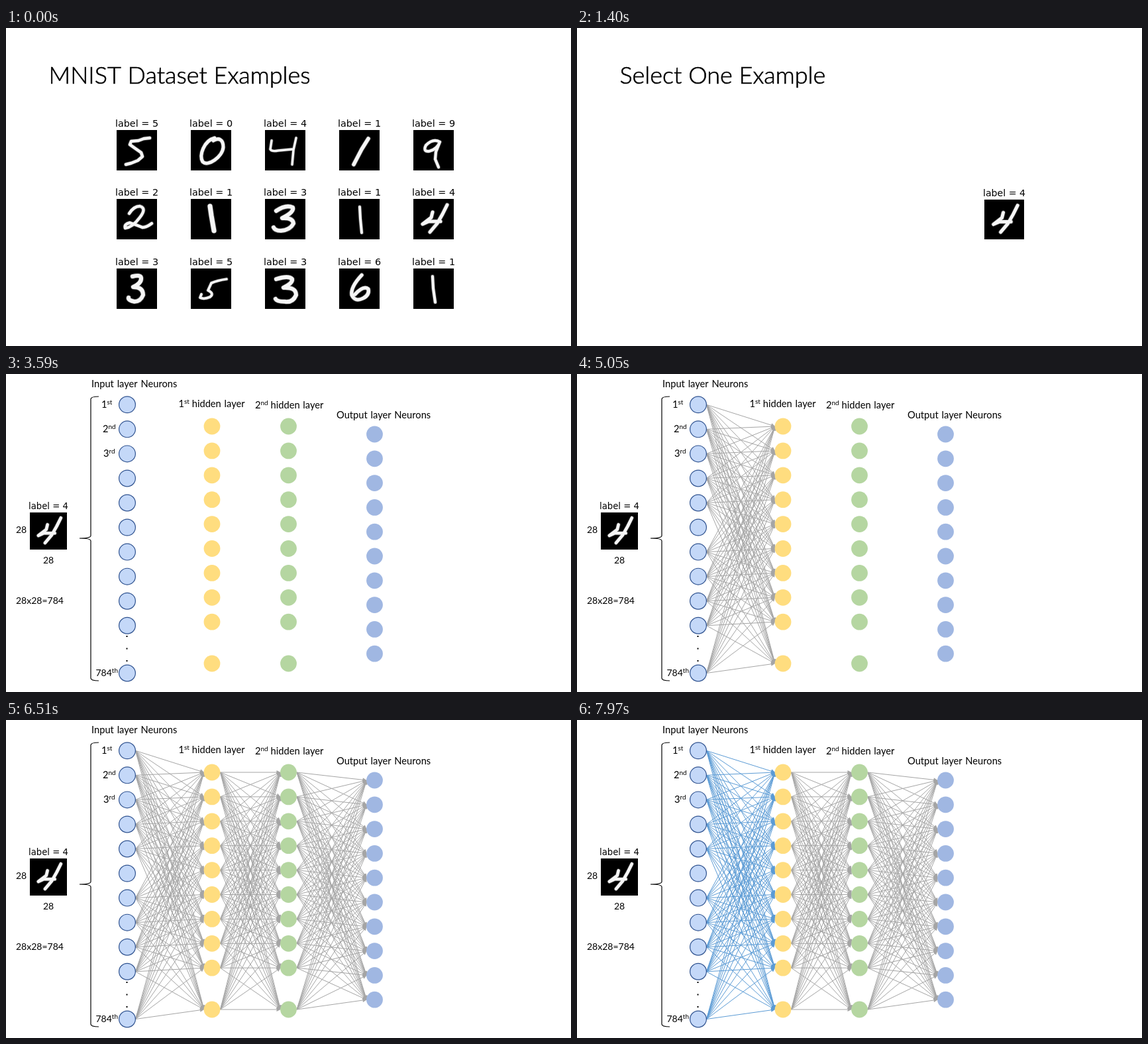
Animation of 853 by 480 pixels, one loop 8000 ms. Source, as an HTML page with a canvas:

```html
<!DOCTYPE html>
<html lang="en">
<head>
<meta charset="utf-8">
<title>Digit network</title>
<style>
html, body { margin: 0; width: 100%; height: 100%; overflow: hidden; background: #fff; }
canvas { display: block; }
</style>
</head>
<body>
<canvas id="stage" width="853" height="480"></canvas>
<script>
const ctx = document.getElementById('stage').getContext('2d');
const LOOP = 8000, FIRST = 670, STEP = 730;
const GRAY = '#a5a5a5', BLUE = '#5b9bd5';

// Handwritten digits in a 61-unit box: label, stroke width, path
const digits = [
  [5, 4.5, 'M50 12L41 13 33 16 22 17 20 22 27 27 37 34 39 40 32 46 22 50 14 52'],
  [0, 5, 'M36 12C20 16 12 38 18 48C26 56 48 40 49 26C49 14 42 11 34 16'],
  [4, 3.4, 'M10 16L8 29Q10 33 20 31L41 29M47 12L43 30 41 52'],
  [1, 5.5, 'M44 13L34 29 22 52'],
  [9, 4.2, 'M40 18Q30 12 19 23Q14 33 24 32Q36 29 40 18L34 33 33 44 38 56'],
  [2, 4.4, 'M19 22Q26 11 35 11Q46 14 35 28Q24 43 13 44Q11 38 20 36Q32 40 39 43Q45 43 53 37'],
  [1, 7, 'M29 11L31 25 35 48'],
  [3, 6, 'M17 18Q32 8 42 13Q44 20 26 29Q42 28 43 37Q38 47 24 48Q15 48 13 43'],
  [1, 4, 'M31 12L32 30 34 51'],
  [4, 5, 'M29 20L27 28 14 38L23 34 41 34M51 9L44 23 36 37 25 50'],
  [3, 6, 'M24 12Q36 9 37 14Q38 22 25 28Q40 28 40 40Q36 50 27 50Q17 48 18 44'],
  [5, 3.7, 'M54 16Q40 18 31 22L26 33Q36 38 29 43Q20 47 14 44L16 39'],
  [3, 6, 'M17 16Q36 10 41 16Q42 22 28 29Q47 28 47 40Q42 52 30 50Q18 50 16 46'],
  [6, 5.3, 'M34 10Q17 28 19 40Q24 51 36 45Q46 40 44 31Q37 25 24 39'],
  [1, 4.2, 'M29 12L30 30 33 51']
].map(([label, width, path]) => ({ label, width, path: new Path2D(path) }));
const chosen = digits[9];

const column = (y, gap, n) => Array.from({ length: n }, (_, i) => y + gap * i);
const hiddenY = [...column(79, 36.9, 9), 437];
const layers = [
  { x: 183, fill: '#c4d8f8', stroke: '#2f528f', ys: [...column(46.3, 37.05, 10), 451.5] },
  { x: 311, fill: '#ffdd7f', ys: hiddenY },
  { x: 426.5, fill: '#b5d6a1', ys: hiddenY },
  { x: 556.5, fill: '#a0b7e2', ys: column(91, 36.8, 10) }
];
const brace = new Path2D('M140 34Q128 34 128 38V244Q128 248 111 248Q128 248 128 252V459Q128 463 140 463');

function text(str, x, y, font, align = 'left') {
  ctx.font = font;
  ctx.textAlign = align;
  ctx.fillStyle = '#000';
  ctx.fillText(str, x, y);
}

// A hairline outline brings the light face to a medium-light weight
function title(str, x = 64.5, y = 84, align) {
  text(str, x, y, '300 36px Lato, Carlito, sans-serif', align);
  ctx.strokeStyle = '#000';
  ctx.lineWidth = 0.6;
  ctx.strokeText(str, x, y);
}

// Body text; "1^st^ word" raises the part between carets
function note(str, x, y, size = 14.7) {
  ctx.wordSpacing = '1px';
  str.split('^').forEach((part, i) => {
    const sup = i % 2;
    text(part, x, y - sup * 5, `${sup ? 10 : size}px Lato, Carlito, sans-serif`);
    x += ctx.measureText(part).width;
  });
  ctx.wordSpacing = '0px';
}

function card(digit, x, y, size = 61) {
  ctx.save();
  ctx.translate(x, y);
  ctx.scale(size / 61, size / 61);
  text('label = ' + digit.label, 30.5, -5, '14.4px "DejaVu Sans", sans-serif', 'center');
  ctx.fillStyle = '#000';
  ctx.fillRect(0, 0, 61, 61);
  ctx.lineCap = ctx.lineJoin = 'round';
  ctx.strokeStyle = 'rgba(255,255,255,.3)';
  ctx.lineWidth = digit.width + 1.6;
  ctx.stroke(digit.path);
  ctx.strokeStyle = '#f6f6f6';
  ctx.lineWidth = digit.width;
  ctx.stroke(digit.path);
  ctx.restore();
}

function grid() {
  digits.forEach((d, i) => {
    const col = i % 5, row = Math.floor(i / 5);
    card(d, Math.round(166.6 + col * 112.2), Math.round(153.6 + row * 104.7));
  });
}

function ring() {
  ctx.strokeStyle = '#f00';
  ctx.lineWidth = 2;
  ctx.beginPath();
  ctx.arc(645, 282, 55, 0, 7);
  ctx.stroke();
}

function arrow(x1, y1, x2, y2, color) {
  const a = Math.atan2(y2 - y1, x2 - x1), c = Math.cos(a), s = Math.sin(a);
  const bx = x2 - 6 * c, by = y2 - 6 * s;
  ctx.strokeStyle = ctx.fillStyle = color;
  ctx.lineWidth = 1;
  ctx.beginPath();
  ctx.moveTo(x1, y1);
  ctx.lineTo(bx, by);
  ctx.stroke();
  ctx.beginPath();
  ctx.moveTo(x2, y2);
  ctx.lineTo(bx - 3 * s, by + 3 * c);
  ctx.lineTo(bx + 3 * s, by - 3 * c);
  ctx.fill();
}

function connect(i, color, count) {
  const from = layers[i], to = layers[i + 1];
  from.ys.slice(0, count).forEach((y1, k) => {
    if (i === 0 && k === 5) return;
    for (const y2 of to.ys) arrow(from.x + 12.5, y1, to.x - 12, y2, color);
  });
}

function network(links, color = GRAY, firstCount) {
  for (let i = 0; i < links; i++) connect(i, i ? GRAY : color, i ? undefined : firstCount);
  for (const { x, ys, fill, stroke } of layers) {
    for (const y of ys) {
      ctx.beginPath();
      ctx.arc(x, y, 12.4, 0, 7);
      ctx.fillStyle = fill;
      ctx.fill();
      if (!stroke) continue;
      ctx.strokeStyle = stroke;
      ctx.lineWidth = 1.2;
      ctx.stroke();
    }
  }
  ctx.fillStyle = '#000';
  for (const y of [396, 414.5, 433]) ctx.fillRect(181.5, y - 1, 2, 2);
  ctx.strokeStyle = '#000';
  ctx.lineWidth = 1.2;
  ctx.stroke(brace);
  card(chosen, 36, 209, 56);
  note('28', 15, 240, 14);
  note('28', 56, 286, 14);
  note('28x28=784', 15, 347, 14);
  note('Input layer Neurons', 129, 20);
  note('1^st^ hidden layer', 260.5, 50);
  note('2^nd^ hidden layer', 376, 52);
  note('Output layer Neurons', 499, 67);
  note('1^st^', 144, 51);
  note('2^nd^', 146, 88);
  note('3^rd^', 147, 125);
  note('784^th^', 135.5, 456, 14);
}

function select(x, y) {
  title('Select One Example');
  card(chosen, x, y, 60);
}

const scenes = [
  () => { title('MNIST Dataset Examples'); grid(); },
  () => { title('Select One Example'); grid(); ring(); },
  () => select(615, 259),
  () => select(78, 198),
  () => select(78, 198),
  () => network(0),
  () => network(1, GRAY, 1),
  () => network(1),
  () => network(2),
  () => network(3),
  () => title('Forward Propagation', 426, 251, 'center'),
  () => network(3, BLUE)
];

const start = performance.now();
function draw() {
  const t = (performance.now() - start) % LOOP;
  const index = t < FIRST ? 0 : 1 + Math.floor((t - FIRST) / STEP);
  ctx.fillStyle = '#fff';
  ctx.fillRect(0, 0, 853, 480);
  scenes[index]();
  requestAnimationFrame(draw);
}
draw();
</script>
</body>
</html>
```
